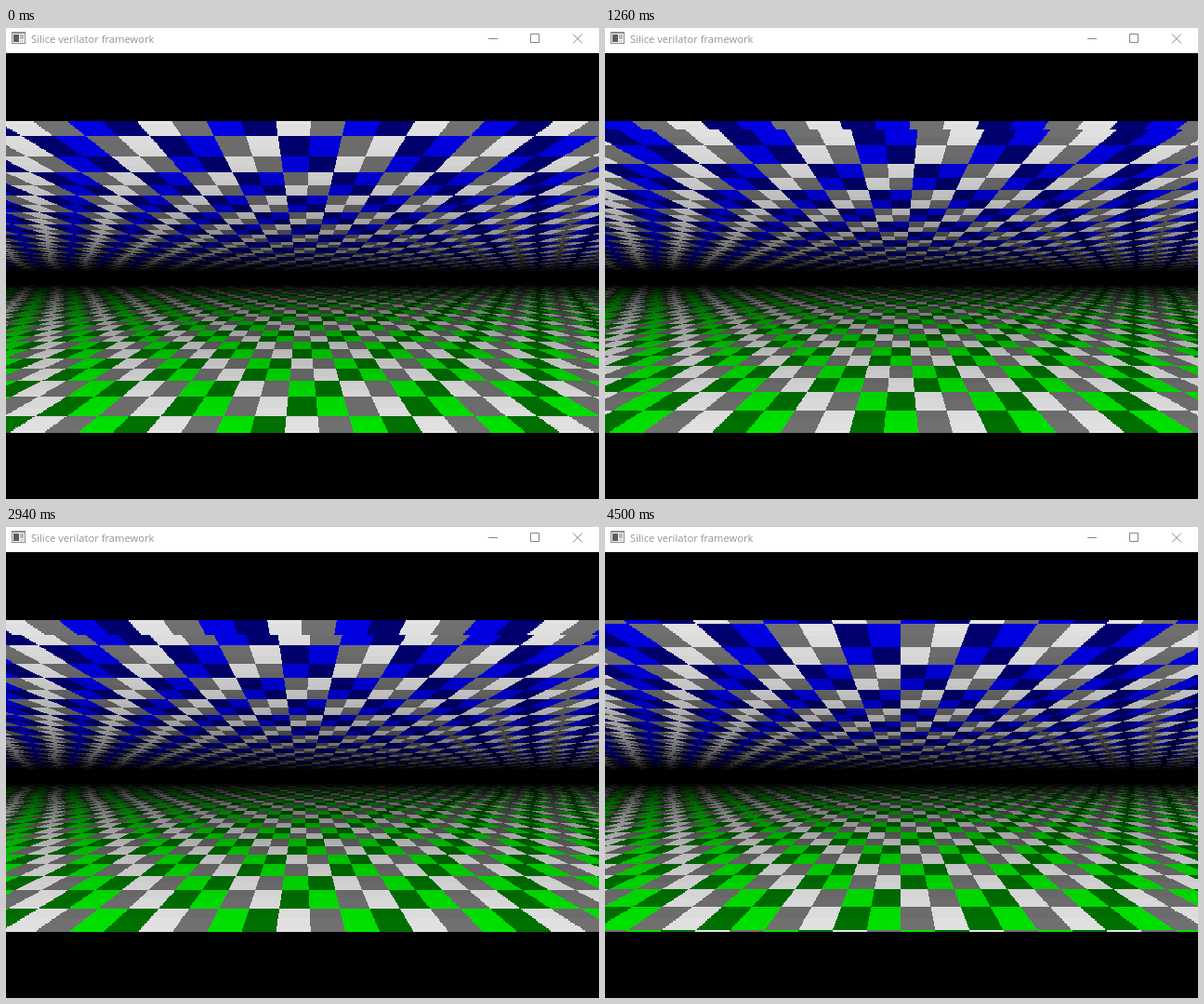
An HTML page with a canvas that plays this animation: 638 by 506 pixels, repeating every 4.56 s.

```html
<!DOCTYPE html>
<html lang="en">
<head>
<meta charset="utf-8">
<title>Silice verilator framework</title>
<style>
  html, body { margin: 0; width: 100%; height: 100%; overflow: hidden; background: #000; }
  svg, canvas { position: absolute; left: 0; display: block; }
  svg { top: 0; }
  canvas { top: 100px; }
  text { font: 11.2px "Open Sans", "Noto Sans", sans-serif; fill: #949494; }
</style>
</head>
<body>
<svg width="638" height="27">
  <rect width="638" height="27" fill="#fff"/>
  <g shape-rendering="crispEdges">
    <rect x="6" y="4" width="15" height="13" fill="#8c8c8c"/>
    <rect x="7" y="6" width="13" height="10" fill="#f4f4f4"/>
    <rect x="8" y="7" width="6" height="8" fill="#585f5c"/>
    <rect x="15" y="7" width="4" height="5" fill="#b4b8b6"/>
    <rect x="15" y="13" width="4" height="2" fill="#d4d4d4"/>
  </g>
  <text x="27" y="16">Silice verilator framework</text>
  <path d="M519 11.5h10M564.5 6.5h9v9h-9zM610 6.5l10 10M620 6.5l-10 10" fill="none" stroke="#858585"/>
</svg>
<canvas id="view" width="638" height="335"></canvas>
<script>
const LOOP = 4560, STEP = 60;
const TOP = 100, BOTTOM = 435, WIDTH = 638, CENTER = 318, HORIZON = 268;
// The picture is redrawn from top to bottom by a slow scan beam.
const PERIOD = 335.2, FIRST_END = 98.6, ROWS_PER_MS = 1.82;

const ctx = document.getElementById('view').getContext('2d');
const image = ctx.createImageData(WIDTH, BOTTOM - TOP);
const pixels = new Uint32Array(image.data.buffer);

function drawRow(y, pass) {
  const isFloor = y >= HORIZON;
  const inv = Math.floor(22000 / (isFloor ? y - 236 : 300 - y));
  const lum = Math.max(0, 70 - (inv >> 3));
  const posU = 4 * (pass - 13);
  const v = inv + 3 * (pass - 13) + 16;
  const start = (y - TOP) * WIDTH;

  for (let x = 0; x < WIDTH; x++) {
    const cell = (posU + ((x - CENTER) * inv >> 8)) ^ v;
    const level = (cell & 16 ? lum : lum >> 1) * 4;
    const tint = cell & 32 ? (isFloor ? 0x000100 : 0x010000) : 0x010101;
    pixels[start + x] = 0xff000000 + level * tint;
  }
}

function draw(now) {
  const t = Math.floor(now % LOOP / STEP) * STEP;
  for (let y = TOP; y < BOTTOM; y++) {
    drawRow(y, Math.floor((t - FIRST_END + (BOTTOM - y) / ROWS_PER_MS) / PERIOD));
  }
  ctx.putImageData(image, 0, 0);
}

const begin = performance.now();
function tick() {
  draw(performance.now() - begin);
  requestAnimationFrame(tick);
}
tick();
</script>
</body>
</html>
```
